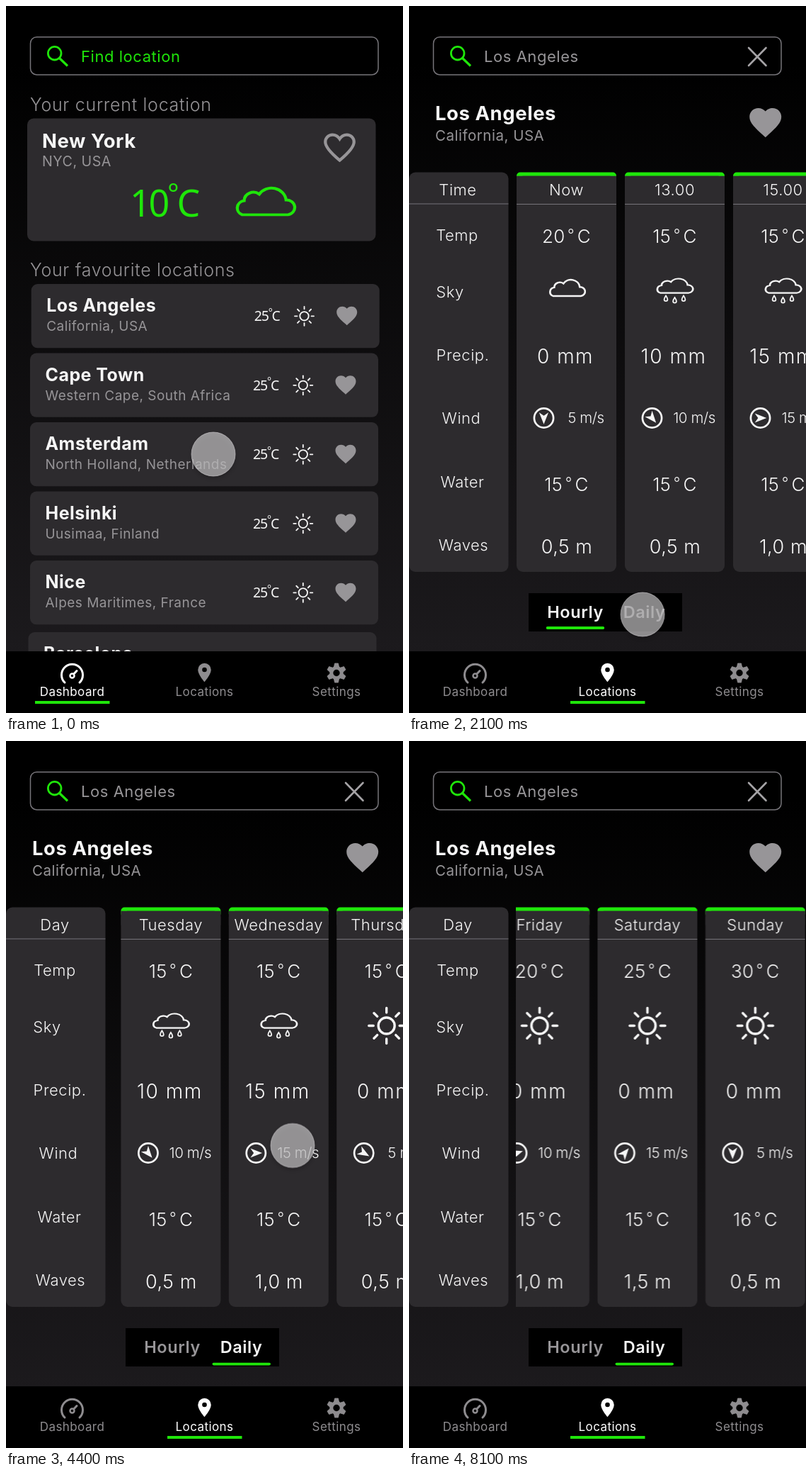
Recreate the animation shown at these times as an HTML page. Size 561 px wide and 997 px high, loop 8.8 s.

```html
<!DOCTYPE html>
<html lang="en">
<head>
<meta charset="utf-8">
<title>Weather app</title>
<style>
  html, body { margin: 0; width: 100%; height: 100%; overflow: hidden; background: #000; }
  svg { display: block; width: 561px; height: 997px; }
  text { font-family: Inter, "Open Sans", sans-serif; font-size: 22px; font-weight: 350; letter-spacing: .025em; fill: #f6f6f6; white-space: pre; }
  .mid { text-anchor: middle; }
  .green { fill: #1fe60a; }
  .dim { fill: #979598; }
  .search { font-weight: 400; }
  .section { font-size: 25px; fill: #979598; letter-spacing: .028em; }
  .name { font-size: 25px; font-weight: 700; letter-spacing: .018em; }
  .title { font-size: 27.5px; font-weight: 700; letter-spacing: .02em; }
  .sub { font-size: 19px; font-weight: 400; fill: #979598; letter-spacing: .025em; }
  .degree { font-family: "Noto Sans", "Open Sans", sans-serif; font-weight: 400; letter-spacing: -.06em; }
  .value { font-size: 26px; font-weight: 300; letter-spacing: .01em; }
  .rain { font-size: 28px; font-weight: 300; letter-spacing: .055em; }
  .wave { font-size: 27px; font-weight: 300; letter-spacing: .02em; }
  .speed { font-size: 20.5px; font-weight: 300; letter-spacing: -.02em; }
  .tab { font-size: 23.5px; font-weight: 600; letter-spacing: .025em; }
  .nav { font-size: 17px; font-weight: 400; text-anchor: middle; }
  #detail, #daily { opacity: 0; }
</style>
</head>
<body>
<svg id="stage" viewBox="0 0 561 997" xmlns="http://www.w3.org/2000/svg"></svg>
<script>
const LOOP = 8800;
const GREEN = '#1fe60a', CARD = '#2d2b2e', GREY = '#979598', WHITE = '#f6f6f6';
const STEP = 152.4;

const text = (x, y, s, cls = '', more = '') => `<text x="${x}" y="${y}" class="${cls}" ${more}>${s}</text>`;
const rect = (x, y, w, h, fill, r = 0, more = '') =>
  `<rect x="${x}" y="${y}" width="${w}" height="${h}" rx="${r}" fill="${fill}" ${more}/>`;
const use = (id, x, y, scale, color, more = '') =>
  `<use href="#${id}" transform="translate(${x} ${y}) scale(${scale}) ${more}" fill="${color}" stroke="${color}"/>`;

const rays = Array.from({ length: 8 }, (_, i) =>
  `<path d="M0-18.5V-25" transform="rotate(${i * 45})"/>`).join('');
const drop = (x, y) => `<path d="M${x} ${y}q-2.4 3.6-2.4 5.2a2.4 2.4 0 0 0 4.8 0q0-1.6-2.4-5.2z"/>`;
const cloud = 'M8 25H45.5A6.7 6.7 0 0 0 44 11.7A12 12 0 0 0 22 6.6A7.6 7.6 0 0 0 9.6 12.4A6.6 6.6 0 0 0 8 25Z';
const gearTeeth = Array.from({ length: 6 }, (_, i) =>
  `<path d="M-2.6-6L-1.8-9.8H1.8L2.6-6z" stroke-width=".6" transform="rotate(${i * 60})"/>`).join('');

// Icon symbols are centred on the origin.
const defs = `<defs>
  <linearGradient id="sky" x2="0" y2="1"><stop offset=".08" stop-color="#000"/><stop offset=".92" stop-color="#1c1a1d"/></linearGradient>
  <clipPath id="pane"><rect x="151.5" y="230" width="410" height="572"/></clipPath>
  <filter id="shade" x="-30%" y="-30%" width="160%" height="160%"><feGaussianBlur stdDeviation="3"/></filter>
  <g id="heart" stroke="none" transform="translate(-12 -12.2)"><path d="M12 21.35l-1.45-1.32C5.4 15.36 2 12.28 2 8.5 2 5.42 4.42 3 7.5 3c1.74 0 3.41.81 4.5 2.09C13.09 3.81 14.76 3 16.5 3 19.58 3 22 5.42 22 8.5c0 3.78-3.4 6.86-8.55 11.54z"/></g>
  <g id="heartLine" fill="none" stroke-width="1.9" transform="translate(-12 -12.2)"><path d="M12 20Q3 12.5 3 8.5A4.5 4.5 0 0 1 7.5 4Q10.3 4 12 6.6Q13.7 4 16.5 4A4.5 4.5 0 0 1 21 8.5Q21 12.5 12 20z"/></g>
  <g id="sun" fill="none" stroke-width="3.4" stroke-linecap="round"><circle r="11.5"/>${rays}</g>
  <g id="cloud" fill="none" stroke-width="2.5"><path d="${cloud}" transform="scale(1.05 .96) translate(-27 -13)"/></g>
  <g id="rain" fill="none">
    <path d="${cloud}" stroke-width="2.5" transform="translate(0 -3) scale(1.07 .84) translate(-27 -13)"/>
    <g stroke-width="1.8">${drop(-12.5, 11)}${drop(0, 13.5)}${drop(12.5, 11)}</g></g>
  <g id="wind"><circle r="13.6" fill="none" stroke-width="2.7"/></g>
  <g id="arrow" stroke="none"><path d="M0-8.8L6.6 7.8L0 3.2L-6.6 7.8z"/></g>
  <g id="gauge" fill="none" stroke-width="3" stroke-linecap="round"><path d="M-10.5 11.5A15 15 0 1 1 10.5 11.5"/><circle cy="2" r="3" stroke-width="2.5"/><path d="M2.3-.5L6.5-5"/></g>
  <g id="pin" stroke="none"><path fill-rule="evenodd" d="M0-10a7 7 0 0 0-7 7c0 5.25 7 13 7 13s7-7.75 7-13a7 7 0 0 0-7-7zm0 9.5a2.5 2.5 0 1 1 0-5 2.5 2.5 0 0 1 0 5z"/></g>
  <g id="gear" stroke-linejoin="round"><circle r="5.2" fill="none" stroke-width="3.6"/>${gearTeeth}</g>
</defs>`;

const backdrop = rect(0, 0, 561, 997, 'url(#sky)');

const search = (s, cls) =>
  rect(34.5, 43.7, 491.5, 53.3, '#000', 9, 'stroke="#77757a" stroke-width="1.5"') +
  `<circle cx="68.7" cy="66.7" r="9.3" fill="none" stroke="${GREEN}" stroke-width="2.8"/>` +
  `<path d="M75.5 73.5L87 84.5" stroke="${GREEN}" stroke-width="3.2"/>` +
  text(106, 78.5, s, 'search ' + cls);

const navBar = active => {
  const items = [['Dashboard', 'gauge', 93.5, 942.5, 1], ['Locations', 'pin', 280.5, 940, 1.32], ['Settings', 'gear', 467, 940.5, 1.38]];
  return rect(0, 910, 561, 87, '#000') + items.map(([label, icon, x, y, scale], i) => {
    const color = i === active ? '#fff' : '#8e8c8f';
    return use(icon, x, y, scale, color) + text(x, 973, label, 'nav', `style="fill:${color}"`) +
      (i === active ? rect(x - 52.5, 980, 105.5, 4, GREEN) : '');
  }).join('');
};

// Narrow temperature reading with a raised degree sign.
const reading = (x, y, n, size, cls = '') => text(x, y,
  `${n}<tspan dy="${-size * .37}" style="font-size:${size * .73}px">°</tspan><tspan dy="${size * .37}">C</tspan>`,
  'degree ' + cls, `style="font-size:${size}px"`);

const place = ([name, region, x, y]) => rect(x, y, 492, 90.3, CARD, 9) +
  text(x + 21.5, y + 39, name, 'name') + text(x + 21.5, y + 66, region, 'sub') +
  reading(x + 315, y + 52, 25, 19.5) +
  use('sun', x + 385.8, y + 45.3, .54, WHITE) + use('heart', x + 446, y + 45, 1.45, GREY);

const dashboard = backdrop + search('Find location', 'green') +
  text(34, 148, 'Your current location', 'section') +
  rect(30, 158.5, 492.5, 173, CARD, 9) +
  text(51, 199.5, 'New York', 'title') +
  text(51, 226, 'NYC, USA', 'sub', 'style="font-size:19.7px"') +
  use('heartLine', 471.5, 200, 2.25, GREY) +
  reading(175, 297, 10, 52, 'green') +
  use('cloud', 366.5, 275.5, 1.64, GREEN) +
  text(34, 381, 'Your favourite locations', 'section') +
  [['Los Angeles', 'California, USA', 35.7, 392],
   ['Cape Town', 'Western Cape, South Africa', 34, 489.5],
   ['Amsterdam', 'North Holland, Netherlands', 34, 587],
   ['Helsinki', 'Uusimaa, Finland', 34, 684.5],
   ['Nice', 'Alpes Maritimes, France', 34, 782],
   ['Barcelona', 'Catalonia, Spain', 31.5, 883]].map(place).join('') +
  navBar(0);

const celsius = n => `${n}<tspan dx="3.5" dy="-4" style="font-size:21px">°</tspan><tspan dx="4" dy="4">C</tspan>`;

const column = ([head, temp, sky, rain, angle, wind, water, wave], x) => {
  const c = x + 70.5;
  return rect(x, 234.5, 141, 14, GREEN, 5) + rect(x, 239.7, 141, 558.3, CARD, 9) + rect(x, 239.7, 141, 20, CARD) +
    rect(x, 279, 141, 1, '#77757a') +
    text(c, 267, head, 'mid') +
    text(c, 334, celsius(temp), 'mid value') +
    use(sky, sky === 'cloud' ? c + 1 : c, sky === 'sun' ? 401.5 : 397.5, 1, WHITE) +
    text(c - 1.5, 504, rain + ' mm', 'mid rain') +
    use('wind', x + 38.5, 581, 1, WHITE) + use('arrow', x + 38.5, 581, 1, WHITE, `rotate(${angle})`) +
    text(x + 98, 588, wind + ' m/s', 'mid speed') +
    text(c, 684, celsius(water), 'mid value') +
    text(c + .5, 772, wave + ' m', 'mid wave');
};

const labels = (first, cx) => rect(0, 234.5, 140.5, 563.5, CARD, 9) + rect(0, 278.5, 140.5, 1, '#77757a') +
  [[first, 69, 267], ['Temp', cx, 331], ['Sky', 58, 411], ['Precip.', 76, 500],
   ['Wind', 74, 589], ['Water', 75.5, 679], ['Waves', 77, 768]]
    .map(([s, x, y]) => text(x, y, s, 'mid')).join('');

const toggle = active => rect(169, 828, 217, 54, '#000') +
  text(235, 863, 'Hourly', 'mid tab' + (active ? ' dim' : '')) +
  text(332.5, 863, 'Daily', 'mid tab' + (active ? '' : ' dim')) +
  (active ? rect(291.5, 876.8, 82.5, 3.6, GREEN, 2) : rect(193.7, 875, 82.5, 4, GREEN, 2));

const table = (id, first, cx, step, rows, active) => `<g id="${id}">${labels(first, cx)}
  <g clip-path="url(#pane)"><g id="${id}Cols">${rows.map((row, i) => column(row, 152 + i * step)).join('')}</g></g>
  ${toggle(active)}</g>`;

const days = [
  ['Today', 20, 'cloud', 0, 180, 5, 15, '0,5'],
  ['Tuesday', 15, 'rain', 10, 140, 10, 15, '0,5'],
  ['Wednesday', 15, 'rain', 15, 90, 15, 15, '1,0'],
  ['Thursday', 15, 'sun', 0, 120, 5, 15, '0,5'],
  ['Friday', 20, 'sun', 0, 72, 10, 15, '1,0'],
  ['Saturday', 25, 'sun', 0, 40, 15, 15, '1,5'],
  ['Sunday', 30, 'sun', 0, 180, 5, 16, '0,5']];
const hours = ['Now', '13.00', '15.00'].map((h, i) => [h, ...days[i].slice(1)]);

const detail = `<g id="detail">${backdrop}${search('Los Angeles', 'dim')}
  <path d="M480 59L504.5 84M504.5 59L480 84" stroke="#a5a3a6" stroke-width="2.6" stroke-linecap="round"/>
  ${text(37, 161, 'Los Angeles', 'title')}
  ${text(37, 190, 'California, USA', 'sub', 'style="font-size:20.5px"')}
  ${use('heart', 503.7, 164.6, 2.25, GREY)}
  ${table('hourly', 'Time', 68, 153, hours, 0)}
  ${table('daily', 'Day', 69, STEP, days, 1)}
  ${navBar(1)}</g>`;

const cursor = `<g id="cursor">
  <circle cy="3" r="30" fill="#000" opacity=".3" filter="url(#shade)"/>
  <circle r="31" fill="#dad8da" fill-opacity=".62" stroke="#d0ced0" stroke-opacity=".6"/></g>`;

document.getElementById('stage').innerHTML = defs + dashboard + detail + cursor;

// Each key is [ms, value, easing to the next key].
const play = (id, prop, keys) => {
  const all = [...keys, [LOOP, keys[keys.length - 1][1]]];
  document.getElementById(id).animate(
    all.map(([t, v, easing = 'linear']) => ({ offset: t / LOOP, [prop]: v, easing })),
    { duration: LOOP, iterations: Infinity });
};
const at = (x, y = 0) => `translate(${x}px, ${y}px)`;

play('detail', 'opacity', [[0, 0], [650, 0, 'ease-in-out'], [1100, 1]]);
play('daily', 'opacity', [[0, 0], [2350, 0, 'ease-in-out'], [2850, 1]]);
play('hourly', 'opacity', [[0, 1, 'step-end'], [2850, 0]]);

play('dailyCols', 'transform', [
  [0, at(0)], [3600, at(0), 'cubic-bezier(.5,0,.6,.9)'],
  [4400, at(-142), 'ease-out'], [4750, at(-STEP)],
  [4900, at(-STEP), 'cubic-bezier(.3,.2,.3,1)'],
  [5300, at(-637.6), 'ease-out'], [5850, at(-647.6)]]);

play('cursor', 'transform', [
  [0, at(293, 632), 'ease-in-out'], [550, at(258, 440)], [900, at(253, 438), 'ease-in'],
  [1200, at(255, 455), 'cubic-bezier(.4,.1,.4,1)'], [2100, at(330, 858)],
  [2550, at(334, 855), 'cubic-bezier(.5,0,.8,.7)'],
  [3000, at(379, 657), 'cubic-bezier(.2,.5,.5,1)'], [3450, at(405, 570.5)],
  [6100, at(405, 570.5), 'cubic-bezier(.5,0,.8,.8)'], [6600, at(393, 340)],
  [6700, at(318, 270)], [6800, at(229, 318)], [6900, at(268, 412)], [7000, at(371, 434)],
  [7200, at(468, 399)], [7400, at(526, 318)], [7600, at(528, 205)], [7800, at(480, 75)],
  [7900, at(450, 13)], [8000, at(440, -28)], [8100, at(430, -70)]]);
</script>
</body>
</html>
```
